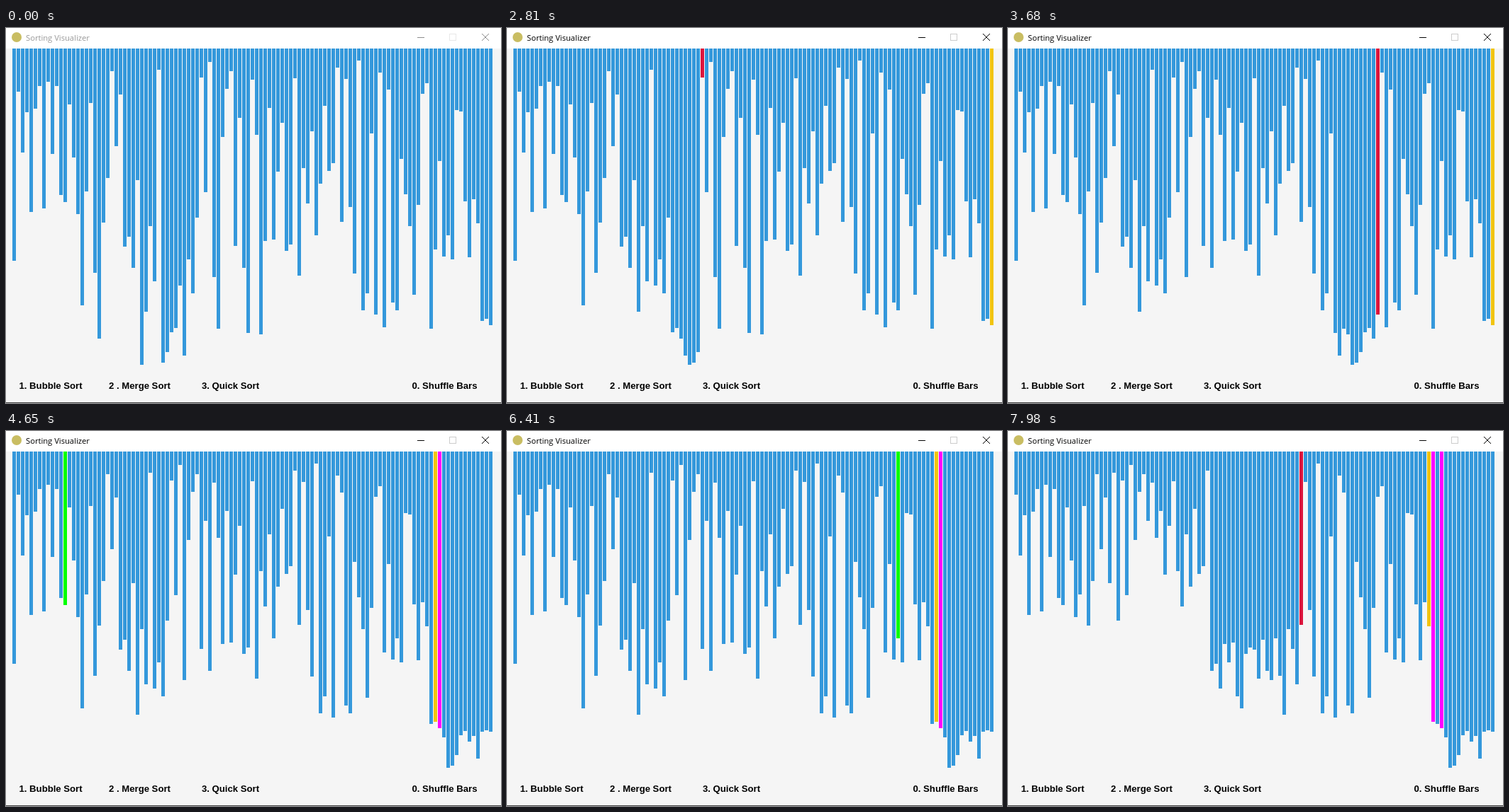
These frames come from a looping animation (698 px wide and 530 px high, 8 s). An HTML page with a canvas:

```html
<!DOCTYPE html>
<html lang="en">
<head>
<meta charset="utf-8">
<title>Sorting Visualizer</title>
<style>
html, body { margin: 0; width: 100%; height: 100%; overflow: hidden; background: #f5f5f5; }
canvas { display: block; }
</style>
</head>
<body>
<canvas id="stage" width="698" height="530"></canvas>
<script>
const ctx = document.getElementById('stage').getContext('2d');
const LOOP = 8000, TOP = 29, UPDATE = 76;
const RED = '#dc143c', GREEN = '#00ff00', BLUE = '#3498db', MAGENTA = '#ff00ff', YELLOW = '#f1c40f';

// The unsorted input: lower edge of each bar. All later orders are computed from it.
const bars = [
  329, 90, 176, 119, 260, 114, 82, 255, 76, 178, 82, 236, 246, 108, 183, 263,
  392, 231, 106, 346, 439, 275, 212, 61, 167, 94, 309, 295, 339, 215, 476, 401,
  280, 358, 59, 473, 458, 430, 424, 364, 463, 327, 375, 268, 70, 232, 48, 352,
  425, 154, 86, 61, 308, 127, 339, 431, 73, 151, 433, 301, 113, 299, 203, 134,
  315, 306, 71, 350, 198, 248, 146, 293, 220, 110, 202, 191, 56, 274, 72, 253,
  347, 46, 399, 375, 149, 405, 63, 423, 87, 388, 399, 185, 235, 280, 377, 250,
  93, 78, 425, 313, 188, 323, 293, 327, 116, 118, 245, 324, 242, 276, 414, 411, 420
];

// Key points are [time, values...]
const pointer = [[130, 616, 522], [260, 557, 443], [2506, 557, 443], [2660, 759, 479]];
const scans = [
  { color: RED, keys: [[1830, -1], [2120, 12], [2810, 44], [3680, 85], [4320, 114]] },
  { color: GREEN, keys: [[4320, -1], [4650, 12], [5570, 56], [6410, 90], [6560, 98]] },
  { color: RED, keys: [[6560, -1], [6880, 13], [7980, 67]] }
];

// Linear between key points, moving only at whole screen updates
function sample(keys, t) {
  const n = keys.filter(k => k[0] <= t).length;
  if (!n) return null;
  const [t0, ...from] = keys[n - 1];
  if (n === keys.length) return from;
  const [t1, ...to] = keys[n];
  const updates = Math.round((t1 - t0) / UPDATE);
  const f = Math.floor((t - t0) / (t1 - t0) * updates + 1e-6) / updates;
  return from.map((v, i) => v + (to[i] - v) * f);
}

function swap(a, i, j) {
  [a[i], a[j]] = [a[j], a[i]];
}

// Move items below the pivot a[hi] to the front, stopping before index end
function partition(a, hi, end) {
  let k = 0;
  for (let j = 0; j < Math.min(end, hi); j++) {
    if (a[j] < a[hi]) swap(a, k++, j);
  }
  return k;
}

// Each pass sorts the part left of the previous pivot
let order = bars, hi = bars.length - 1, done = [];
const passes = scans.map(scan => {
  const pass = { ...scan, order, hi, done };
  order = order.slice();
  const mid = partition(order, hi, hi);
  swap(order, mid, hi);
  done = [...done, mid];
  hi = mid - 1;
  return pass;
});

function sortState(t) {
  const pass = passes.filter(p => p.keys[0][0] <= t).pop();
  if (!pass) return { a: bars, colors: {} };
  const j = Math.floor(sample(pass.keys, t)[0] + 1e-6);
  const a = pass.order.slice();
  partition(a, pass.hi, j);
  const colors = { [pass.hi]: YELLOW };
  for (const d of pass.done) colors[d] = MAGENTA;
  if (j < pass.hi) colors[j] = pass.color;
  return { a, colors };
}

function rect(color, x, y, w, h) {
  ctx.fillStyle = color;
  ctx.fillRect(x, y, w, h);
}

function text(str, x, y, font, color) {
  ctx.font = font;
  ctx.fillStyle = color;
  ctx.fillText(str, x, y);
}

function drawTitle(active) {
  rect('#ffffff', 0, 0, 698, TOP);
  ctx.fillStyle = '#c9bd62';
  ctx.beginPath();
  ctx.arc(15, 13, 7, 0, Math.PI * 2);
  ctx.fill();
  text('Sorting Visualizer', 28, 18, '11.2px "Open Sans", sans-serif', active ? '#000000' : '#999999');

  const ink = active ? '#000000' : '#8c8c8c';
  rect(ink, 580, 13, 10, 1);
  ctx.lineWidth = 1;
  ctx.strokeStyle = active ? '#cccccc' : '#e8e8e8';
  ctx.strokeRect(625.5, 8.5, 9, 9);
  ctx.strokeStyle = ink;
  ctx.beginPath();
  ctx.moveTo(671, 8);
  ctx.lineTo(681, 18);
  ctx.moveTo(681, 8);
  ctx.lineTo(671, 18);
  ctx.stroke();
}

function drawLabels() {
  const font = 'bold 13.15px "Liberation Sans", Arial, sans-serif';
  const label = (str, x) => text(str, x, 510, font, '#000000');
  label('1. Bubble Sort', 18.5);
  label('2 . Merge Sort', 145);
  label('3. Quick Sort', 276);
  label('0. Shuffle Bars', 572.5);
}

function drawPointer(x, y) {
  ctx.fillStyle = '#000000';
  ctx.fill(new Path2D(`M${x} ${y}v12l3-2.5 2.2 5 2-.9-2.2-5 3.5-.1z`));
}

function draw(t) {
  rect('#f5f5f5', 0, 0, 698, 530);
  drawTitle(t >= 1420);
  const { a, colors } = sortState(t);
  a.forEach((end, i) => rect(colors[i] || BLUE, 9 + 6 * i, TOP, 5, end - TOP));
  drawLabels();
  rect('#444444', 0, 529, 698, 1);
  const tip = sample(pointer, t);
  if (tip) drawPointer(...tip);
}

const begin = performance.now();
function frame() {
  draw((performance.now() - begin) % LOOP);
  requestAnimationFrame(frame);
}
frame();
</script>
</body>
</html>
```
